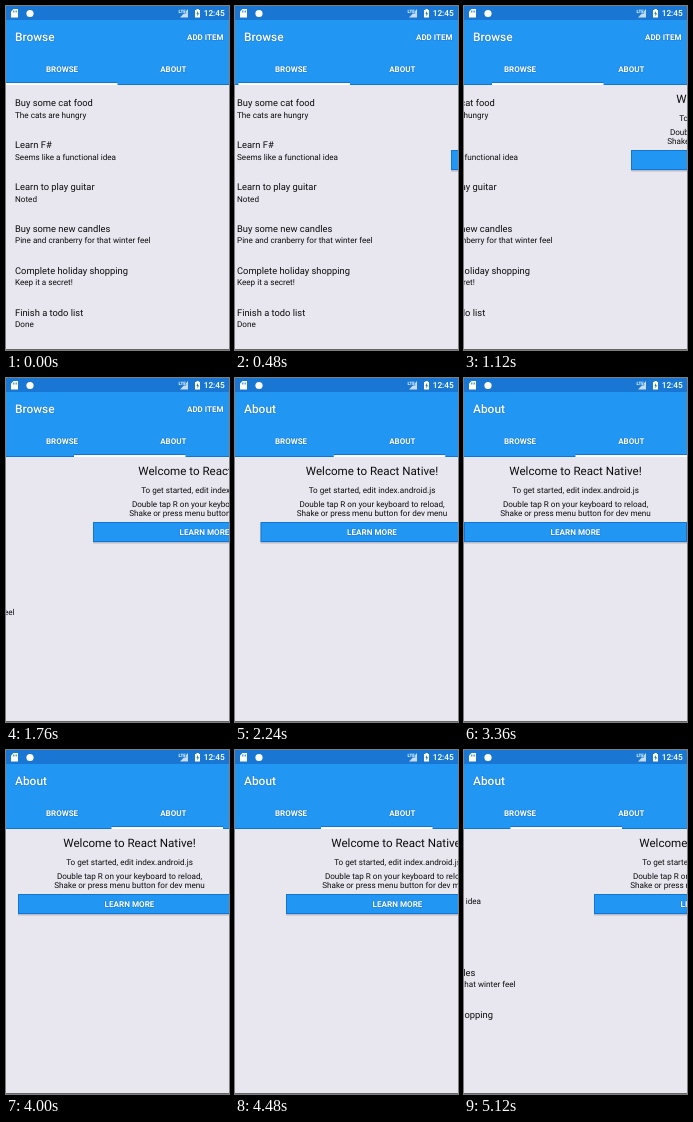
Recreate the animation shown at these times as an HTML page. Size 223x344 px, loop 5.28 s.

```html
<!DOCTYPE html>
<html lang="en">
<head>
<meta charset="utf-8">
<title>Tab swipe</title>
<style>
html, body { margin: 0; width: 223px; height: 344px; overflow: hidden; background: #e8e6ef; }
svg { display: block; font-family: Roboto, Arial, sans-serif; fill: #0c0c0c; text-rendering: geometricPrecision; }
.bar { fill: #fff; font-size: 8px; font-weight: 700; }
.bar text, .label { stroke: #1a7edb; stroke-width: 1; paint-order: stroke; }
.bar .title { font-size: 11.9px; font-weight: 500; }
.name { font-size: 9.36px; }
.note { font-size: 8.13px; }
.mid { text-anchor: middle; }
.edge { fill: #1274d6; }
</style>
</head>
<body>
<svg width="223" height="344" viewBox="0 0 223 344">
  <rect width="223" height="344" fill="#e8e6ef"/>
  <g id="list"></g>
  <g id="about" class="mid note">
    <text x="111.5" y="97" font-size="11.6" style="font-size:11.6px">Welcome to React Native!</text>
    <text x="111.5" y="115">To get started, edit index.android.js</text>
    <text x="111.5" y="129">Double tap R on your keyboard to reload,</text>
    <text x="111.5" y="138">Shake or press menu button for dev menu</text>
    <rect y="145" width="223" height="20.5" fill="#b9bcc8"/>
    <rect x=".5" y="144.5" width="222" height="19" fill="#2196f3" stroke="#1274d6"/>
    <text class="label" x="111.5" y="157.3" fill="#fff" font-weight="700">LEARN MORE</text>
  </g>
  <g class="bar">
    <rect width="223" height="79" fill="#2196f3"/>
    <rect class="edge" y="78" width="223" height="1"/>
    <rect width="223" height="14" fill="#1976d2"/>
    <path d="M7.5 3H12V11.5H5V5.5Z"/>
    <path d="M7.5 4.5v2M9 4.5v2M10.5 4.5v2" stroke="#1976d2" stroke-width=".7"/>
    <circle cx="24" cy="7.5" r="3.6"/>
    <path d="M182 3V11.5H174Z" opacity=".75"/>
    <text x="172.5" y="7" font-size="4.5">LTE</text>
    <path d="M190.5 3H192.8V4H194V11.5H189V4H190.5Z"/>
    <path d="M192 5L190.4 8H191.4V10.5L193 7.3H192Z" fill="#1976d2"/>
    <text x="197.7" y="10.3" font-size="8.3" font-weight="500">12:45</text>
    <text id="title" class="title" x="9" y="35.3"></text>
    <text id="add" x="181" y="33.5">ADD ITEM</text>
    <text class="mid" x="56" y="66">BROWSE</text>
    <text class="mid" x="167.3" y="66">ABOUT</text>
    <g id="line">
      <rect class="edge" y="76" width="111.5" height="1"/>
      <rect y="77" width="111.5" height="2"/>
    </g>
  </g>
  <rect y="343" width="223" height="1" fill="#666"/>
</svg>
<script>
const LOOP = 5280, STEP = 160, WIDTH = 223;
const $ = id => document.getElementById(id);

const items = [
  ['Buy some cat food', 'The cats are hungry'],
  ['Learn F#', 'Seems like a functional idea'],
  ['Learn to play guitar', 'Noted'],
  ['Buy some new candles', 'Pine and cranberry for that winter feel'],
  ['Complete holiday shopping', 'Keep it a secret!'],
  ['Finish a todo list', 'Done']
];
$('list').innerHTML = items.map(([name, note], i) => {
  const y = 100.4 + i * 41.9;
  return `<text class="name" x="9" y="${y}">${name}</text>
    <text class="note" x="9" y="${y + 11.3}">${note}</text>`;
}).join('');

// Swipe distance over time: [ms, px]
const swipe = [
  [0, 0], [240, 0], [480, 7], [800, 28], [1120, 56], [1440, 93], [1760, 136],
  [2080, 182], [2400, 213], [2720, 222], [2880, 223],
  [3600, 223], [4000, 211], [4320, 188], [4640, 156], [4960, 116], [5120, 93], [LOOP, 71]
];

function swipeAt(t) {
  const i = swipe.findIndex(key => key[0] > t);
  const [t0, x0] = swipe[i - 1], [t1, x1] = swipe[i];
  return x0 + (x1 - x0) * (t - t0) / (t1 - t0);
}

function move(id, x) {
  $(id).setAttribute('transform', `translate(${x})`);
}

function draw(now) {
  const t = Math.floor(now % LOOP / STEP) * STEP;
  const x = swipeAt(t), browsing = t < 2240;
  move('list', -x);
  move('about', WIDTH - x);
  move('line', x / 2);
  $('title').textContent = browsing ? 'Browse' : 'About';
  $('add').style.display = browsing ? '' : 'none';
}

const start = performance.now();
function tick() {
  draw(performance.now() - start);
  requestAnimationFrame(tick);
}
tick();
</script>
</body>
</html>
```
